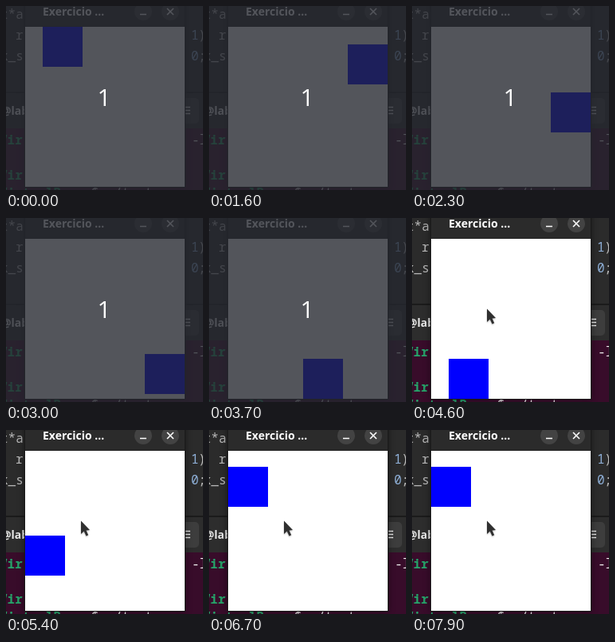
Write an HTML page with a canvas that moves like this. It is 247 by 230 pixels and loops after 8 s.

```html
<!DOCTYPE html>
<html lang="en">
<head>
<meta charset="utf-8">
<style>
  html, body { margin: 0; width: 100%; height: 100%; overflow: hidden; background: #2b2b2b; }
  canvas { display: block; width: 247px; height: 230px; }
</style>
</head>
<body>
<canvas id="stage" width="247" height="230"></canvas>
<script>
const ctx = document.getElementById('stage').getContext('2d');
const LOOP = 8000, STEP = 100;
const DIM_END = 3900, CURSOR_START = 4100;
const AREA = { x: 24, y: 26, size: 200 }, SIDE = 50, TRACK = AREA.size - SIDE;
const SANS = '"Open Sans", "Noto Sans", sans-serif';
const MONO = '"Noto Sans Mono", "DejaVu Sans Mono", monospace';

// [time, distance travelled clockwise from the top left corner]
const route = [
  [0, 22], [100, 42], [500, 73], [600, 84], [1600, 172], [2300, 232], [3700, 356],
  [4000, 382], [4600, 428], [4900, 450], [5400, 494], [5600, 512], [5700, 512],
  [6600, 574], [6700, 580], [7300, 612], [7500, 600], [7600, 600], [7900, 580]
];
// Spans where the picture stands still, showing the position at their start
const holds = [[100, 500], [600, 1600], [2100, 2300]];

function distanceAt(time) {
  const hold = holds.find(([from, to]) => time >= from && time < to);
  const t = hold ? hold[0] : time;
  const next = route.findIndex(([at]) => at >= t);
  if (next < 0) return route[route.length - 1][1];
  if (next === 0) return route[0][1];
  const [t0, d0] = route[next - 1], [t1, d1] = route[next];
  return d0 + (d1 - d0) * (t - t0) / (t1 - t0);
}

function squareAt(distance) {
  const d = 2 * Math.round(distance / 2) % (4 * TRACK);
  const along = d % TRACK;
  const [x, y] = [[along, 0], [TRACK, along], [TRACK - along, TRACK], [0, TRACK - along]][Math.floor(d / TRACK)];
  return [AREA.x + x, AREA.y + y];
}

function rect(x, y, w, h, color) {
  ctx.fillStyle = color;
  ctx.fillRect(x, y, w, h);
}

function text(str, x, y, color, font) {
  ctx.font = font;
  ctx.fillStyle = color;
  ctx.fillText(str, x, y);
}

function line(x0, y0, x1, y1, width) {
  ctx.lineWidth = width;
  ctx.beginPath();
  ctx.moveTo(x0, y0);
  ctx.lineTo(x1, y1);
  ctx.stroke();
}

function drawEditor() {
  const code = '16px ' + MONO;
  rect(0, 0, 247, 107, '#2b2b2b');
  text('t*a', -7, 16, '#b8b8b8', code);
  text('r', 12, 42, '#b8b8b8', code);
  text('k_s', -7, 68, '#b8b8b8', code);
  text('1', 232, 42, '#8fb0d8', code);
  text(')', 241, 42, '#b8b8b8', code);
  text('0', 232, 68, '#8fb0d8', code);
  text(';', 241, 68, '#b8b8b8', code);
}

function drawTerminal() {
  const regular = '16px ' + MONO, bold = 'bold ' + regular;
  rect(0, 107, 247, 2, '#1b1b1b');
  rect(0, 109, 247, 44, '#2d2d2d');
  text('@lab', -6, 136, '#e8e8e8', 'bold 14px ' + SANS);
  ctx.fillStyle = '#3d3d3d';
  ctx.beginPath();
  ctx.roundRect(208, 115, 34, 32, 5);
  ctx.fill();
  ctx.strokeStyle = '#e8e8e8';
  for (const y of [127, 131, 135]) line(220, y - 0.5, 231, y - 0.5, 1.4);

  rect(0, 153, 247, 77, '#380c2a');
  text('Vir', -8, 173, '#26a269', bold);
  text('-l', 233, 173, '#f0f0f0', regular);
  text('Vir', -8, 217, '#26a269', bold);
  text('VirtualBox', -8, 239, '#26a269', bold);
  text(':', 88, 239, '#f0f0f0', regular);
  text('~', 98, 239, '#3d78c0', bold);
  text('$ ./teste', 107, 239, '#f0f0f0', regular);
}

function drawWindow() {
  ctx.save();
  ctx.shadowColor = 'rgba(0,0,0,.45)';
  ctx.shadowBlur = 8;
  rect(23, -10, 202, 237, '#191919');
  ctx.restore();
  rect(24, 0, 200, 26, '#2b2b2b');
  rect(24, 25, 200, 1, '#202020');
  text('Exercicio …', 46, 12, '#ffffff', 'bold 14px ' + SANS);
  for (const x of [172, 206]) {
    ctx.fillStyle = '#434343';
    ctx.beginPath();
    ctx.arc(x, 7, 11, 0, 2 * Math.PI);
    ctx.fill();
  }
  ctx.strokeStyle = '#ffffff';
  line(168, 10.5, 176, 10.5, 1.5);
  line(202, 3, 210, 11, 1.6);
  line(210, 3, 202, 11, 1.6);
  rect(AREA.x, AREA.y, AREA.size, AREA.size, '#ffffff');
}

function drawCursor() {
  const points = [[94, 113.5], [94, 130], [97.7, 126.6], [100.5, 132.5], [103.2, 131.2], [100.5, 125.5], [105, 125]];
  ctx.save();
  ctx.shadowColor = 'rgba(0,0,0,.3)';
  ctx.shadowBlur = 2;
  ctx.shadowOffsetY = 1;
  ctx.fillStyle = '#303030';
  ctx.beginPath();
  for (const [x, y] of points) ctx.lineTo(x, y);
  ctx.closePath();
  ctx.fill();
  ctx.restore();
}

function drawCountdown() {
  rect(0, 0, 247, 230, 'rgba(38,40,48,.79)');
  ctx.textAlign = 'center';
  text('1', 123, 125, '#ffffff', '30px ' + SANS);
  ctx.textAlign = 'left';
}

function draw(now) {
  const time = Math.floor(now % LOOP / STEP) * STEP;
  drawEditor();
  drawTerminal();
  drawWindow();
  rect(...squareAt(distanceAt(time)), SIDE, SIDE, '#0000ff');
  if (time >= CURSOR_START) drawCursor();
  if (time < DIM_END) drawCountdown();
}

let start;
function tick(now) {
  start ??= now;
  draw(now - start);
  requestAnimationFrame(tick);
}
draw(0);
requestAnimationFrame(tick);
</script>
</body>
</html>
```
